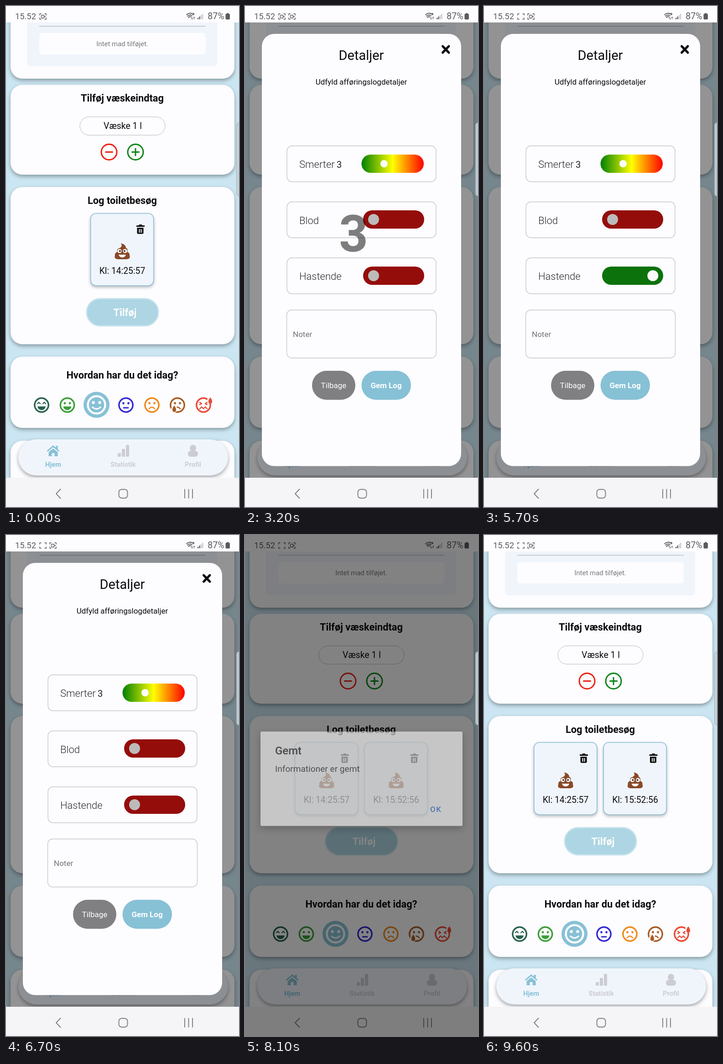
Write an HTML page that moves like this. It is 511 px wide and 1096 px high and loops after 9.9 s.

```html
<!DOCTYPE html>
<html lang="da">
<head>
<meta charset="utf-8">
<title>Dagbog</title>
<style>
html, body { margin: 0; width: 100%; height: 100%; overflow: hidden; background: #fdfcff; }
svg { display: block; width: 100vw; height: 100vh; font-family: Roboto, sans-serif; }
.card { fill: #fdfcff; filter: drop-shadow(0 4px 4px #0005); }
.lift { filter: drop-shadow(0 3px 3px #0004); }
.line { fill: none; stroke-linecap: round; stroke-linejoin: round; }
</style>
</head>
<body>
<svg id="stage" viewBox="0 0 511 1096"></svg>
<script>
const LOOP = 9900, STEP = 100;
const BLUE = '#87c1d6', PALE = '#f0f5fc', PAPER = '#fdfcff', BROWN = '#8f7c52';

// Markup helpers
const rect = (x, y, w, h, r, fill, more = '') =>
  `<rect x="${x}" y="${y}" width="${w}" height="${h}" rx="${r}" fill="${fill}" ${more}/>`;
const circle = (x, y, r, fill, more = '') => `<circle cx="${x}" cy="${y}" r="${r}" fill="${fill}" ${more}/>`;
const path = (d, fill, more = '') => `<path d="${d}" fill="${fill}" ${more}/>`;
const line = (d, color, width) => `<path class="line" d="${d}" stroke="${color}" stroke-width="${width}"/>`;
const text = (s, x, y, size, weight = 400, fill = '#0b0b0d', anchor = 'middle', more = '') =>
  `<text x="${x}" y="${y}" font-size="${size}" font-weight="${weight}" fill="${fill}" text-anchor="${anchor}" ${more}>${s}</text>`;
const group = (id, body, more = '') => `<g id="${id}" ${more}>${body}</g>`;
const at = (x, y, body) => `<g transform="translate(${x} ${y})">${body}</g>`;
const heading = (s, y) => text(s, 255, y, 21.8, 700);
const card = (y, h) => rect(10, y, 491, h, 26, PAPER, 'class="card"');

// Smiley faces, drawn around the origin
function face(x, color, mouth, eyes = [[-5.5, -4], [5.5, -4]]) {
  return at(x, 873, circle(0, 0, 15.2, 'none', `stroke="${color}" stroke-width="3.4"`) +
    eyes.map(([a, b]) => circle(a, b, 2.4, color)).join('') + mouth);
}
function faces() {
  const grin = c => path('M-9 3H9Q7 11 0 11T-9 3z', c);
  const frown = c => line('M-6 8Q0 1 6 8', c, 2.6);
  const drop = c => path('M0 -7Q5 0 4 3A4 4 0 0 1 -4 3Q-5 0 0 -7z', c);
  const [deep, green, blue, orange, brown, red] =
    ['#28614c', '#3a9f36', '#3329d6', '#ee8a1d', '#a85b22', '#e94a36'];
  return face(78, deep, grin(deep) + line('M-9 -3L-6 -6L-3 -3M3 -3L6 -6L9 -3', deep, 2.2), []) +
    face(134.5, green, grin(green)) +
    circle(198.5, 872.5, 28.5, BLUE) +
    at(198.5, 872.5, circle(0, 0, 19, 'none', 'stroke="#fff" stroke-width="4.4"') +
      circle(-7, -5, 3.2, '#fff') + circle(7, -5, 3.2, '#fff') + line('M-9 5Q0 13 9 5', '#fff', 3)) +
    face(263, blue, line('M-5 6H5', blue, 2.8)) +
    face(320, orange, frown(orange)) +
    face(376, brown, frown(brown) + at(-7, 8, circle(0, 1, 7, PAPER) + drop(brown))) +
    face(433, red, line('M-8 -6L-4 -3L-8 -1M8 -6L4 -3L8 -1M-8 8L-4 4L0 8L4 4L8 8', red, 2.4) +
      at(15, -10, circle(0, 0, 7, PAPER) + at(0, 0, drop(red))), []);
}

const poop = at(255, 537,
  path('M-3 -18Q8 -15 8 -8Q13 -6 11 1Q17 3 16 9Q19 17 8 17H-8Q-19 17 -16 9Q-17 3 -11 1Q-13 -6 -5 -8Q1 -11 -3 -18z', '#8a4927') +
  [-6, 6].map(x => circle(x, -1, 4.6, '#fff') + circle(x * .85, -1, 2.1, '#4a2818')).join('') +
  path('M-8 7H8Q6 13 0 13T-8 7z', '#fff'));
const trash = path('M286 480h5l1.500 -2h5l1.500 2h5v3h-18zM287.500 485h14v11q0 2.500 -2.500 2.500h-9q-2.500 0 -2.500 -2.500z', '#050505') +
  path('M291.500 488h2v8h-2zM295.500 488h2v8h-2z', '#fff');
const visit = (id, time) => group(id,
  rect(185.7, 453.700, 138, 158, 12, PALE, `class="lift" stroke="${BLUE}" stroke-width="1.6"`) +
  trash + poop + text('Kl: ' + time, 255, 585.5, 19.3));

function tab(x, label, icon, color) {
  return at(x, 973, icon) + text(label, x, 1008, 14.8, 700, color);
}

function home() {
  const gray = '#cccdd2', sign = (x, c, d) =>
    circle(x, 319.5, 17, 'none', `stroke="${c}" stroke-width="3"`) + line(d, c, 3);
  return rect(0, 36, 511, 996, 0, '#cbe6f2') +
    card(-60, 219) + rect(46, -20, 417, 152, 8, PALE) +
    rect(73, 43.5, 365, 1.6, 0, '#bdc2cb') + rect(73, 59, 365, 47, 6, PAPER) +
    text('Intet mad tilføjet.', 255, 88, 15, 400, '#78787c') +
    card(172.500, 196.500) + heading('Tilføj væskeindtag', 209) +
    rect(162, 242.500, 187, 40, 20, 'none', 'stroke="#b9b9bf"') + text('Væske 1 l', 256, 269, 19.4) +
    sign(226, '#ea2010', 'M218.500 319.500h15') + sign(284, '#0b8415', 'M276.500 319.500h15M284 312v15') +
    card(396, 344) + heading('Log toiletbesøg', 433) +
    visit('first', '14:25:57') + visit('second', '15:52:56') +
    group('add', rect(177, 640.500, 157, 59, 29.5, '#add5e3', 'stroke="#c2e2ec" stroke-width="3"') +
      text('Tilføj', 261, 678, 21.8, 700, '#fff')) +
    card(767, 156) + heading('Hvordan har du det idag?', 815) + faces() +
    card(951, 120) + rect(27, 948, 460, 79, 39.5, PALE, 'class="card" style="fill:#f0f5fc"') +
    tab(103.5, 'Hjem', path('M-14 0L0 -12L6 -7V-11H10V-3L14 0L12 2L0 -8L-12 2zM-10 3L0 -5L10 3V12H3V5H-3V12H-10z', BLUE), BLUE) +
    tab(257, 'Statistik', [0, 1, 2].map(i => rect(-12 + i * 9, 5 - i * 9, 7, 8 + i * 9, 1.5, gray)).join(''), gray) +
    tab(410, 'Profil', circle(0, -6, 7, gray) + rect(-11, 0, 22, 13, 6, gray), gray);
}

// Stool illustrations: brown shapes with halftone shade
const shaded = d => path(d, BROWN) + path(d, 'url(#dots)', 'transform="translate(1 1)" opacity=".9"');
const ink = d => path(d, BROWN, `stroke="${BROWN}" stroke-width="1.500"`);
function blob(x, y, rx, ry, wave = 0, lobes = 3, turn = 0) {
  let d = '';
  for (let i = 0; i < 40; i++) {
    const a = i * Math.PI / 20, k = 1 + wave * Math.sin(a * lobes + turn);
    d += (i ? 'L' : 'M') + (x + rx * k * Math.cos(a)).toFixed(1) + ' ' + (y + ry * k * Math.sin(a)).toFixed(1);
  }
  return d + 'z';
}
function lump(x, y, rx, ry, ...wave) {
  return ink(blob(x, y, rx, ry, ...wave)) + shaded(blob(x + 1.500, y + 1.500, rx * .75, ry * .75, ...wave));
}
let seed = 7;
const rand = () => (seed = seed * 16807 % 2147483647) / 2147483647;

const pictures = [
  () => [[111, 321], [147, 321], [182, 318], [209, 332], [134, 345], [178, 346]]
    .map(([x, y], i) => lump(x, y, i % 2 ? 9 : 10, i > 3 ? 12 : 13)).join(''),
  () => {
    let s = ink(blob(355, 336, 48, 22));
    for (let i = 0; i < 6; i++) s += ink(blob(313 + i * 17, 322 - 5 * Math.sin(i * .63), 12, 11));
    for (let i = 0; i < 5; i++) s += lump(315 + i * 20, 348 + 3 * Math.sin(i * .8), 14, 14) + lump(318 + i * 19, 328, 11, 8);
    return s;
  },
  () => {
    let s = ink(blob(159, 518, 62, 21));
    for (let i = 0; i < 10; i++) {
      const x = 102 + i * 12.8, h = 5 * Math.sin(i * .35);
      s += ink(blob(x, 507 - h, 9, 10)) + ink(blob(x, 528 + h, 9, 10)) +
        line(`M${x + 4} ${501 - h}q6 8 2 18`, '#65583b', 1);
    }
    return s + shaded('M96 518Q125 528 160 525T224 516Q220 534 190 537Q135 544 103 532z');
  },
  () => ink('M285 495Q300 491 330 506Q368 519 398 514Q425 514 421 528Q417 543 388 542Q330 541 295 511Q283 502 285 495z') +
    shaded('M289 500Q325 521 365 526Q400 527 420 520Q418 539 388 539Q333 538 297 510z'),
  () => [[111, 714, 16, 14], [143, 698, 13, 12], [177, 686, 15, 13], [215, 688, 14, 12], [159, 722, 20, 12], [203, 726, 15, 14]]
    .map((b, i) => lump(...b, .13, 3 + i % 2, i * 1.7)).join(''),
  () => {
    let s = ink(blob(352, 704, 54, 15, .08, 9));
    for (let i = 0; i < 55; i++) {
      const a = rand() * 6.28, k = .6 + rand() * .4;
      s += ink(blob(351 + 63 * k * Math.cos(a), 704 + 23 * k * Math.sin(a), 3 + rand() * 4, 3 + rand() * 3, .2, 3, a));
    }
    for (let i = 0; i < 22; i++) s += shaded(blob(300 + rand() * 106, 695 + rand() * 23, 6, 4, .25, 3, i));
    return s + lump(373, 725, 12, 7, .15, 4);
  },
  () => ink('M228 857Q240 848 265 851Q298 849 305 860Q298 872 309 877Q327 879 326 889Q318 896 326 903Q307 907 297 912Q304 925 276 929Q240 933 222 922Q226 911 208 906Q190 905 192 893Q190 882 211 879Q198 872 222 873Q236 874 238 867Q220 866 228 857z') +
    path('M238 846L255 845L249 852Q246 847 238 846z', BROWN) +
    ink(blob(204, 919, 15, 8, .05)) + shaded('M194 917Q205 924 217 918Q213 928 200 926z') +
    shaded('M195 887Q205 896 225 899L239 902Q222 907 208 903Q193 900 195 887zM278 890Q300 898 322 895Q305 908 280 905zM226 859Q240 866 255 862Q245 870 230 865zM229 916Q255 929 290 919Q280 929 250 928Q236 926 229 916z')
];

function tile(i) {
  const x = i < 6 ? 79 + i % 2 * 191.5 : 175, y = 265 + (i >> 1) * 185.500;
  return rect(x, y, 162, 156, 10, PAPER, 'stroke="#88878b" stroke-width="2.4"') + pictures[i]() +
    circle(x + 141.500, y + 22, 13, '#98979b') + circle(x + 140.500, y + 21, 9, '#f8f8fa') +
    text('i', x + 140.500, y + 27, 18, 700, '#88878b', 'middle', 'font-family="Noto Serif, serif" font-style="italic"') +
    text('Type ' + (i + 1), x + 81.500, y + 143, 14.8, 500);
}

const title = (name, sub) => text(name, 255, 118, 29) + text(sub, 255, 172, 17);
const field = (label, y) => rect(92, y, 327, 78.500, 11, 'none', 'stroke="#c8c8ce" stroke-width="1.4"') +
  text(label, 119, y + 48, 22, 300, '#2b2b30', 'start');
const toggle = (id, y) => rect(259, y - 20, 134, 40, 20, '', `id="${id}Track"`) + circle(282, y, 12, '', `id="${id}Knob"`);

function details() {
  return title('Detaljer', 'Udfyld afføringslogdetaljer') +
    field('Smerter', 306) + text('0', 201, 353.500, 20, 400, '#222', 'start', 'id="pain"') +
    rect(255.500, 325, 136.500, 40, 20, 'url(#scale)') + circle(305, 345, 8, '#fff', 'id="painKnob"') +
    field('Blod', 428.500) + toggle('blood', 467) +
    field('Hastende', 551) + toggle('urgent', 590) +
    rect(91.500, 665, 328, 105, 11, 'none', 'stroke="#c8c8ce" stroke-width="1.4"') +
    text('Noter', 105, 724, 17, 400, '#737377', 'start') +
    rect(147, 798, 95, 63.500, 31.7, '#807f81') + text('Tilbage', 194.500, 836, 17, 400, '#fff') +
    rect(255.500, 798, 108.500, 63.500, 31.7, BLUE) + text('Gem Log', 309.500, 836, 17, 700, '#fff') +
    text('3', 238, 537, 111, 700, '#000', 'middle', 'id="big" opacity=".5"');
}

const bracket = x => line(`M${x} 20v-3h3M${x + 11} 17h3v3M${x + 14} 26v3h-3M${x + 3} 29h-3v-3`, '#5b5a5e', 1.5);
const camera = x => rect(x + 3.5, 20, 6, 6.5, 1.5, 'none', 'stroke="#5b5a5e" stroke-width="1.4"') +
  path(`M${x + 9.500} 23l3 -2v4z`, '#5b5a5e');

function statusBar() {
  const c = '#5b5a5e';
  return rect(0, 0, 511, 36, 0, PAPER) + text('15.52', 20, 29, 18.3, 400, c, 'start') +
    bracket(74) + group('dot', camera(74)) + group('still', bracket(96) + camera(96)) +
    line('M396 19Q403 13 411 18M398 22Q403 18 408 21M400 25Q403 22 406 24', c, 1.8) +
    text('6', 411, 20, 8, 700, c) + line('M408 24v5M406.500 27.500l1.500 1.500l1.500 -1.500M412.500 29v-5M411 25.500l1.500 -1.500l1.500 1.500', c, 1) +
    [0, 1, 2, 3].map(i => rect(420 + i * 3.4, 26 - i * 3, 2.2, 3 + i * 3, 0, i < 2 ? c : '#c4c3c7')).join('') +
    text('87%', 478.500, 29, 19.6, 400, c, 'end') + rect(481.500, 17, 9.500, 12.500, 2, c) + rect(484, 15.500, 4.500, 3, 1, c);
}

const navBar = rect(0, 1032, 511, 64, 0, '#f5f4f7') +
  line('M119.500 1057L110 1067L119.500 1077', '#808084', 1.9) +
  rect(247.500, 1057.500, 19, 19, 6, 'none', 'stroke="#808084" stroke-width="1.9"') +
  line('M392 1057.500v19M400.500 1057.500v19M409 1057.500v19', '#808084', 1.9);

document.getElementById('stage').innerHTML = `<defs>
  <linearGradient id="scale"><stop stop-color="#008000"/><stop offset=".5" stop-color="#ff0"/><stop offset="1" stop-color="#f00"/></linearGradient>
  <pattern id="dots" width="3" height="3" patternUnits="userSpaceOnUse" patternTransform="rotate(40)">${circle(1.500, 1.500, 1, '#393329')}</pattern></defs>` +
  home() +
  group('modal', rect(0, 36, 511, 996, 0, '#000', 'opacity=".42"') + rect(37, 61, 437, 945.500, 27, PAPER) +
    line('M433.500 88L447 102M447 88L433.500 102', '#0b0b0d', 5) +
    group('types', title('Afførings-dagbog', 'Vælg din afføringstype') +
      text('09-01-2025', 255, 216, 24.4, 300) + pictures.map((p, i) => tile(i)).join('')) +
    group('details', details())) +
  statusBar() + navBar +
  rect(0, 0, 511, 1096, 0, '#000', 'id="dim"') +
  rect(505.500, 255, 14, 161, 6, '#c3d2da', 'stroke="#9aa9b1" opacity=".9"') +
  group('alert', rect(34, 430, 443, 206.500, 3, '#fff', 'style="filter:drop-shadow(0 6px 8px #0006)"') +
    text('Gemt', 66, 480, 24, 500, '#1c1c1e', 'start') +
    text('Informationer er gemt', 66, 518, 19.1, 400, '#2a2a2c', 'start') +
    text('OK', 406, 606, 17, 500, '#266bd0', 'start', 'letter-spacing="1.6"'));

// Motion
const $ = id => document.getElementById(id);
const set = (id, name, value) => $(id).setAttribute(name, value);
const show = (id, on) => set(id, 'opacity', +on);
const clamp = v => Math.max(0, Math.min(1, v));
const ease = v => (v = clamp(v)) < .5 ? 2 * v * v : 1 - 2 * (1 - v) ** 2;
const easeOut = v => 1 - (1 - clamp(v)) ** 3;
const mix = (a, b, p) => a + (b - a) * p;
const rgb = (a, b, p) => `rgb(${a.map((v, i) => Math.round(mix(v, b[i], p)))})`;

function setToggle(id, p) {
  set(id + 'Track', 'fill', rgb([148, 13, 11], [0, 123, 12], p));
  set(id + 'Knob', 'fill', rgb([188, 187, 186], [255, 255, 255], p));
  set(id + 'Knob', 'cx', mix(282, 378, p));
}

function draw(t) {
  const saved = t >= 6800, rated = t >= 2900, detail = t >= 1800;
  const slide = start => ease((t - start + 100) / 500);

  show('still', t >= 200);
  show('dot', t < 200 || Math.floor((t - 185) / 495) % 2 === 0);
  show('second', saved);
  set('first', 'transform', `translate(${saved ? -76 : 0} 0)`);
  set('second', 'transform', 'translate(76.5 0)');
  show('add', t === 300 ? .7 : 1);

  show('modal', easeOut((t - 600) / 600) * (1 - ease((t - 6700) / 500)));
  show('types', !detail);
  show('details', detail);
  $('pain').textContent = rated ? '3' : '0';
  set('painKnob', 'cx', rated ? 305 : 270);
  show('big', false);
  if (rated && t < 3600) set('big', 'opacity', .5);
  setToggle('blood', slide(3600) - slide(5000));
  setToggle('urgent', slide(4400) - slide(5700));

  const shown = ease((t - 7000) / 500), left = clamp((8400 - t) / 370);
  set('dim', 'opacity', .6 * shown * left);
  set('alert', 'opacity', shown * (t < 8100 ? 1 : clamp(.55 - (t - 8100) / 230)));
}

function frame(now) {
  draw(Math.floor(now % LOOP / STEP) * STEP);
  requestAnimationFrame(frame);
}
draw(0);
requestAnimationFrame(frame);
</script>
</body>
</html>
```
